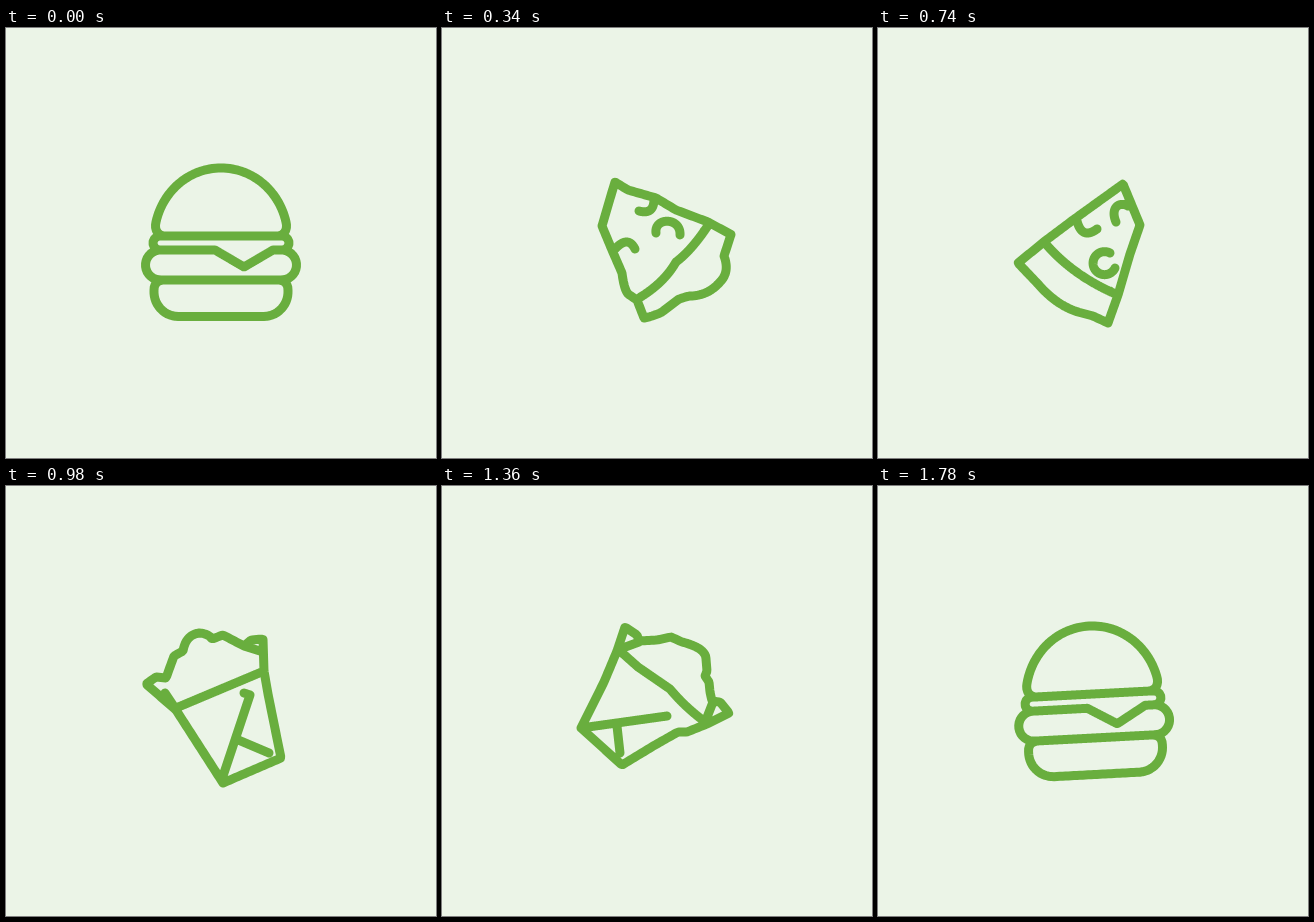
An HTML page with a canvas for the animation above (1.8 s loop, 430x430 px).

```html
<!DOCTYPE html>
<html lang="en">
<head>
<meta charset="utf-8">
<title>Food icon loop</title>
<style>
html, body { margin: 0; width: 100%; height: 100%; overflow: hidden; background: #ebf4e7; }
canvas { display: block; }
</style>
</head>
<body>
<canvas id="stage" width="430" height="430"></canvas>
<script>
const LOOP = 1800, SAMPLES = 200, MID = 215;
const ctx = document.getElementById('stage').getContext('2d');

// Each drawing: outline, then five inner strokes. Strokes an icon lacks hide under its other lines.
const burger = [
  'M215 140C247 140 273 163 280 194C282 202 278 208 271 208H276A7 7 0 0 1 276 222A15 15 0 0 1 275 252H273Q282 253 282 262V264A24.5 24.5 0 0 1 257 288.5H173A24.5 24.5 0 0 1 148 264V262Q148 253 157 252H155A15 15 0 0 1 154 222A7 7 0 0 1 154 208H159C152 208 148 202 150 194C157 163 183 140 215 140Z',
  'M155 252H275',
  'M275 208H155',
  'M277 222H267L238 239L209 222H153',
  'M185 252h1',
  'M275 208h1'
];
const pizzaIn = [
  'M289 206.5L282 228Q288 244 278 254Q266 268 247 268L237 271L220 284Q212 288 202 290L195 272L186 266Q182 261 180 245L170 222L160 198L170 164L173 154L186 162L200 166L214 170L234 182L250 188L266 194Z',
  'M267 196Q250 222 234 234Q222 255 197 270',
  'M214 205C212 189 239 189 238 207',
  'M173 221Q186 207 193 221',
  'M197 183Q212 187 212 171',
  'M262 203l1 -1'
];
const pizzaOut = [
  'M230 295L215 288L200 284Q178 277 160 256L140 235L167 213L195 192L245 156L262 197L252 226L240 267Z',
  'M240 267Q195 248 167 215',
  'M232 225A11.5 11.5 0 1 0 237 240',
  'M199 193Q204 212 219 201',
  'M238 194C232 180 241 173 250 178',
  'M232 263l1 1'
];
const pizza = ['M230 295Q178 278 140 235L252 153Z', ...pizzaOut.slice(1)];
const boxIn = [
  'M217 297L170 224L140 198L150 191L160 192L168 170L177 165Q180 148 194 147Q203 148 206 153L217 149L238 160L245 154L257 153L258 185L262 208L275 272Z',
  'M217 290L244 209L238 207',
  'M230 253L263 267',
  'M170 222L258 185',
  'M238 160L254 165',
  'M169 222L159 207'
];
const boxOut = [
  'M139 242L162 196L175 165L183 141L195 149L197 155L215 154L229 151L240 156Q264 162 264 173L265 185L263 190L267 196L268 206L270 215L278 216L287 227L265 238L245 246L236 246L213 259L180 279Z',
  'M139 242L225 230',
  'M175 240L178 267',
  'M178 165L196 181L228 203Q243 221 262 235',
  'M271 216L264 234',
  'M178 163L197 156'
];
const burgerIn = [
  'M175 163L200 151Q221 144 234 155L245 166L247 170L266 180Q276 185 275 190L266 199Q278 191 285 202Q289 212 277 221Q286 219 289 228Q294 248 280 257L219 293Q196 301 186 279Q173 278 168 267Q166 259 172 254Q158 255 157 243Q151 243 149 234Q146 225 146 213Q149 178 175 163Z',
  'M187 278L242 232',
  'M215 203L165 243L157 243',
  'M275 188L264 200L242 228L212 228L172 253',
  'M236 237l1 -1',
  'M272 190l1 -1'
];

// Sample each stroke evenly, turned back by the given angle.
function sample(drawing, angle) {
  const r = -angle * Math.PI / 180, c = Math.cos(r), s = Math.sin(r);
  return drawing.map(d => {
    const path = document.createElementNS('http://www.w3.org/2000/svg', 'path');
    path.setAttribute('d', d);
    const len = path.getTotalLength();
    return Array.from({ length: SAMPLES + 1 }, (_, i) => {
      const p = path.getPointAtLength(len * i / SAMPLES);
      const x = p.x - MID, y = p.y - MID;
      return [x * c - y * s, x * s + y * c];
    });
  });
}

// time, drawing, angle it is drawn at, bend toward the next pose (1 ease in, -1 ease out)
const poses = [
  [0, burger, 0, 1],
  [340, pizzaIn, 68, -1],
  [580, pizza, 148, 1],
  [740, pizzaOut, 148, 0],
  [980, boxIn, 196, 0],
  [1360, boxOut, 272, 0],
  [1580, burgerIn, 316, -1],
  [1780, burger, 359, 0],
  [LOOP, burger, 360, 0]
].map(([time, drawing, angle, bend]) => ({ time, bend, strokes: sample(drawing, angle) }));

function draw(t) {
  const n = poses.findIndex(p => p.time > t);
  const a = poses[n - 1], b = poses[n];
  const u = (t - a.time) / (b.time - a.time);
  const k = u + a.bend * (u * u - u);

  ctx.setTransform(1, 0, 0, 1, 0, 0);
  ctx.fillStyle = '#ebf4e7';
  ctx.fillRect(0, 0, 430, 430);
  ctx.translate(MID, MID);
  ctx.rotate(2 * Math.PI * t / LOOP);
  ctx.strokeStyle = '#69ae3e';
  ctx.lineWidth = 9;
  ctx.lineCap = ctx.lineJoin = 'round';
  ctx.beginPath();
  a.strokes.forEach((points, s) => points.forEach(([x, y], i) => {
    const [x2, y2] = b.strokes[s][i];
    ctx[i ? 'lineTo' : 'moveTo'](x + (x2 - x) * k, y + (y2 - y) * k);
  }));
  ctx.stroke();
}

let start;
function tick(now) {
  start ??= now;
  draw((now - start) % LOOP);
  requestAnimationFrame(tick);
}
draw(0);
requestAnimationFrame(tick);
</script>
</body>
</html>
```
